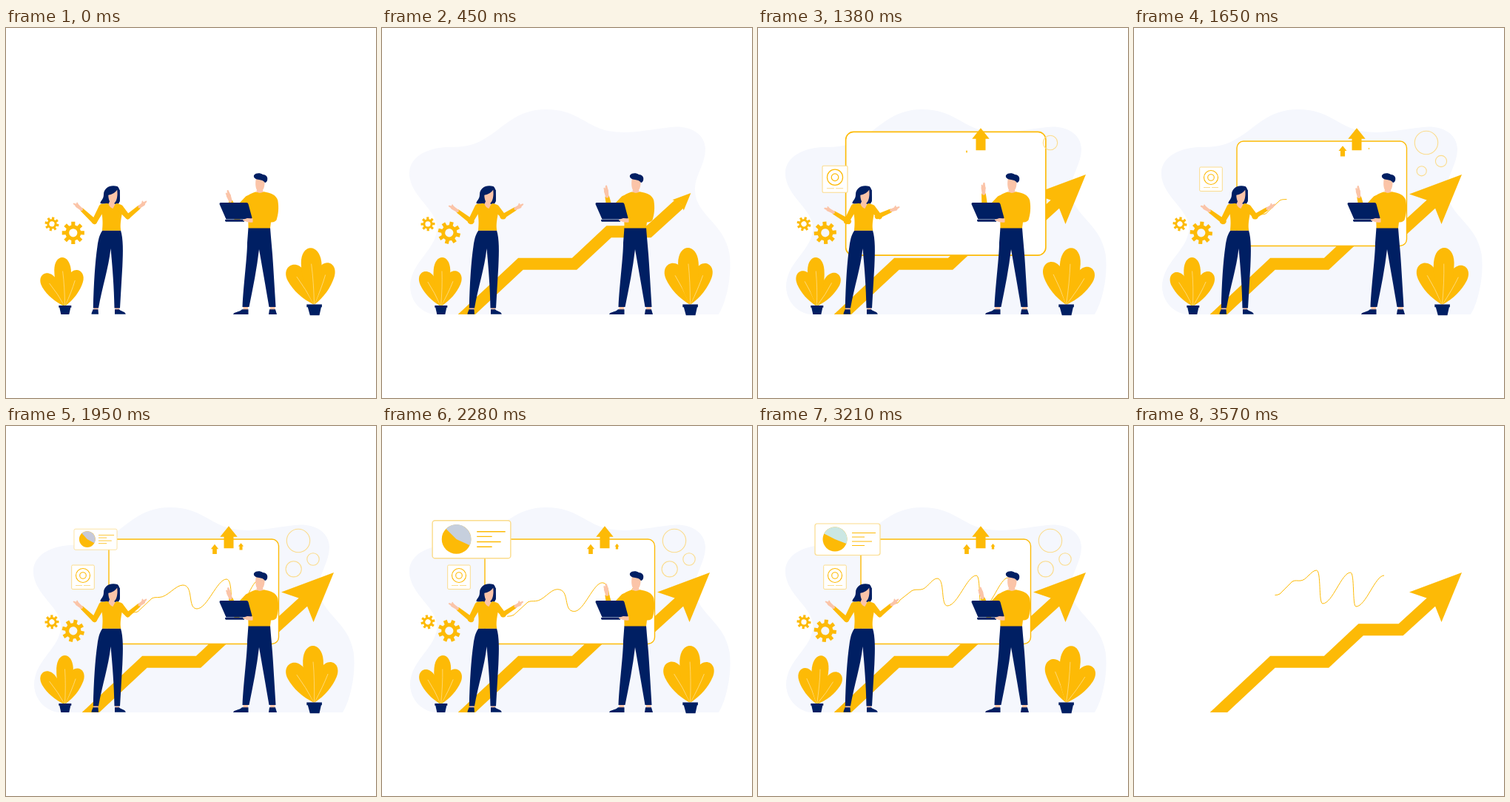
An HTML page for the animation above (3600 ms loop, 500 by 500 pixels).

```html
<!DOCTYPE html>
<html lang="en">
<head>
<meta charset="utf-8">
<title>Growth presentation</title>
<style>
  html, body { margin: 0; width: 100%; height: 100%; overflow: hidden; background: #fff; }
  svg { display: block; width: 100vw; height: 100vh; }
  .y { fill: #fdba06; }
  .n { fill: #001f63; }
  .s { fill: #fbc4a8; }
  .line { fill: none; stroke: #fdba06; }
  .pale { fill: none; stroke: #fbdc8c; }
  .card { fill: #fff; stroke: #fbdc8c; }
</style>
</head>
<body>
<svg viewBox="0 0 500 500">
  <defs><clipPath id="ground"><rect width="500" height="387"/></clipPath></defs>

  <path id="blob" fill="#f5f7fd" d="M222 110C180 110 165 135 138 150C112 166 92 158 72 163C46 169 34 184 37.5 203C43 232 78 248 74 275C70 302 38 318 38 350C39 375 60 387 72 387H455C468 365 473 328 469.500 305C463 264 424 253 423 220C422 200 437 185 437 163C436 140 412 131 390 134C355 138 335 144 305 139C275 132 262 110 222 110Z"/>

  <g clip-path="url(#ground)">
    <path id="shaft" class="line" stroke-width="16" stroke-miterlimit="8" pathLength="1" d="M102.4 398.200L187.300 318.800H260L306.500 275.300H360.500L406 233.800"/>
  </g>
  <path id="head" class="y" d="M443 198L372 224.500L395.500 232.500L407 243.500L415.500 265Z"/>

  <rect id="board" x="139" y="153" width="229.500" height="141.500" rx="9" fill="#fff" stroke="#fdba06" stroke-width="1.4"/>
  <path id="wave" class="line" stroke-width="1" pathLength="1"/>

  <g id="front">
    <g id="ups"></g>
    <g id="rings"></g>

    <g id="target">
      <rect class="card" x="88.7" y="188" width="30.6" height="32.5" rx="1.5"/>
      <circle class="line" cx="104" cy="202" r="9.5" stroke-width="1.1"/>
      <circle class="line" cx="104" cy="202" r="4.3" stroke-width="1.1"/>
      <path class="pale" d="M94 215.500H103M105 215.500H114"/>
    </g>

    <g id="chart">
      <rect class="card" x="77" y="132" width="88" height="42.5" rx="3" stroke-width="1.2"/>
      <circle class="y" cx="104" cy="153" r="16.5"/>
      <path id="slice"/>
      <path class="line" stroke-width="1.2" d="M127 144.500H159M127 150H144M127 156H154M127 161.500H144"/>
    </g>

    <path id="gear1" class="y" fill-rule="evenodd"/>
    <path id="gear2" class="y" fill-rule="evenodd"/>

    <g id="plants"></g>
    <path class="n" d="M71.300 375H88.300V377.800H87.300L85.300 387H74.300L72.300 377.800H71.300Z"/>
    <path class="n" d="M406.300 373.500H426.900V377.300H425.900L423.500 388.300H410.800L407.800 377.300H406.300Z"/>

    <g id="woman">
      <path class="n" d="M150.500 214C141 211 132 216 132 225C132 232 127.500 233 127.500 237C133 238.500 143 238.500 152 237.500C155 234 153.500 226 153.500 220C153 217 152 215 150.500 214Z"/>
      <path class="s" d="M118.500 377H124.500V381H118.500ZM147.500 377H153V381H147.500Z"/>
      <path class="n" d="M130.500 273.500H155C158.500 285 158.300 302 157.300 322L154 378.500H146.500C146 350 144 325 141.500 298C138.500 325 130 350 125 378.500H117.800C118.500 345 120.500 315 123.500 295C125 284 127 278 130.500 273.500Z"/>
      <path class="n" d="M117.500 380.200H124.500L125 386.700H115.500C115.500 384 117 383 117.500 380.200ZM147 380.200H153C155.500 383 161 383 161.800 386.700H147Z"/>
      <path class="y" d="M137 237C131 237 128 239 127.500 243L130 254C131 263 130.500 268 130 273.700H155.300C154 267 155 260 157 250L158 243C156 239 153 237.500 149.500 237L145 240Z"/>
      <g id="armL">
        <path class="y" data-limb="130,242,9,119.5,261.5,7"/>
        <g class="fore">
          <path class="y" data-limb="119.5,261.5,7,103,246,5"/>
          <path class="s" data-limb="102,245,4,96,240,5"/>
          <path class="s" data-limb="97,240.500,4,91.700,237.500,2"/>
          <path class="s" data-limb="97,240,3,96,236.500,1.800"/>
        </g>
      </g>
      <g id="armR">
        <path class="y" data-limb="154,243,9,164.5,255,6.5"/>
        <g class="fore">
          <path class="y" data-limb="164.5,255,6.5,179.5,242.5,5"/>
          <path class="s" data-limb="180.5,241.5,4,185.5,238,5"/>
          <path class="s" data-limb="185,238,4,189.3,234.500,2"/>
          <path class="s" data-limb="184.5,238,3,184.5,234.500,1.8"/>
        </g>
      </g>
      <path class="s" d="M138.500 224C142 220 147 218 150.500 218.500C151 226 150 234 146.500 236.500L147 239L144.500 244C141 243 139 240 138.500 237.500L140 234.500C138.500 231 138 227 138.500 224Z"/>
      <path class="n" d="M135 226C141 226 147.500 223.500 150.500 218L151.500 233L153.800 235V219L148 214L137 216Z"/>
    </g>

    <g id="man">
      <path class="s" d="M320.500 376H327V381H320.500ZM357 376H363.500V381H357Z"/>
      <path class="n" d="M327.500 270H357C358 285 360 302 361 320L364.500 377H355.500C351 350 346 322 342 299C339 325 334 350 328.500 377H319.500C321 345 326 310 326 290Z"/>
      <path class="n" d="M319 380.200H327.500V387H307C308 383.500 314 384.500 319 380.200ZM356 380.200H364L366 387H355Z"/>
      <path class="y" data-limb="327,231,9,311,247,8"/>
      <g id="wrist">
        <path class="y" data-limb="306,247,9,305.3,224,6"/>
        <path class="s" data-limb="305.3,222,4.5,305.3,215,6"/>
        <path class="s" data-limb="306,215,4.5,306.5,208.500,2.4"/>
        <path class="s" data-limb="304.5,216,3.5,303.5,211,2"/>
      </g>
      <path class="y" d="M337 221.500C341 222.500 345 222.500 348.500 221.300C358 223 365.500 226 367.300 233C369 243 368 252 365.500 259.500C363 262.500 360 262.500 358 262.500L357 270.500H327.500L327 240L320.500 236C321.500 228 328 225 337 221.500Z"/>
      <path class="s" d="M338 203L349.500 206C349.800 212 349 216.500 347 219L347.800 221.600C344 223.300 341 223 338 221.600L339 219C336.800 215 336.800 208 338 203Z"/>
      <path class="n" d="M335 199C338 195.300 344 196 347 198C351 198 354 201 353.200 205C353 207.500 351 209 350 209C348 206 345 205.500 342 205C338 204.500 334 203 335 199Z"/>
      <path class="n" d="M290 236H325Q327 236 327.500 238L332.500 256.500L331 258.500H297.500L288.500 238Q288.300 236 290 236ZM296 259H322V261.700H297Q296 261.500 296 259Z"/>
      <path class="s" d="M320 259L326 257L333.500 257.500V262.500C328 263.500 324 261.500 320 260Z"/>
    </g>
  </g>
</svg>
<script>
const LOOP = 3600, STEP = 30, LAST = LOOP - STEP;
const NS = 'http://www.w3.org/2000/svg';
const $ = id => document.getElementById(id);
const put = (el, attrs) => { for (const k in attrs) el.setAttribute(k, attrs[k]); return el; };
const add = (box, tag, attrs) => put(box.appendChild(document.createElementNS(NS, tag)), attrs);
const lerp = (a, b, u) => a + (b - a) * u;

// Smooth curve through [time, value] pairs without extra overshoot
function curve(...p) {
  const n = p.length;
  const slope = i => (p[i + 1][1] - p[i][1]) / (p[i + 1][0] - p[i][0]);
  const tan = p.map((_, i) => {
    if (!i || i === n - 1) return 0;
    const a = slope(i - 1), b = slope(i);
    return a * b > 0 ? 2 * a * b / (a + b) : 0;
  });
  return t => {
    if (t <= p[0][0]) return p[0][1];
    if (t >= p[n - 1][0]) return p[n - 1][1];
    let i = 0;
    while (t >= p[i + 1][0]) i++;
    const h = p[i + 1][0] - p[i][0], u = (t - p[i][0]) / h, v = 1 - u;
    return p[i][1] * v * v * (1 + 2 * u) + p[i + 1][1] * u * u * (3 - 2 * u)
      + h * (tan[i] * u * v * v - tan[i + 1] * u * u * v);
  };
}
const POSES = [0, 870, 1380, 1950, 2670, 3210];
const sway = (...v) => curve(...v.map((a, i) => [POSES[i], a]));
const pop = (start, peak, over, end) => curve([start, 0], [peak, over], [end, 1]);

function zoom(el, x, y, sx, sy = sx) {
  const on = sx > .01 && sy > .01;
  el.style.display = on ? '' : 'none';
  if (on) put(el, { transform: `translate(${x} ${y}) scale(${sx} ${sy}) translate(${-x} ${-y})` });
}

// Tapered limb with round ends
for (const el of document.querySelectorAll('[data-limb]')) {
  const [x, y, w, X, Y, W] = el.dataset.limb.split(',').map(Number);
  const d = Math.hypot(X - x, Y - y), nx = (y - Y) / d / 2, ny = (X - x) / d / 2;
  put(el, { d: `M${x + nx * w} ${y + ny * w}A${w / 2} ${w / 2} 0 0 1 ${x - nx * w} ${y - ny * w}`
    + `L${X - nx * W} ${Y - ny * W}A${W / 2} ${W / 2} 0 0 1 ${X + nx * W} ${Y + ny * W}Z` });
}

function gear(el, cx, cy, outer, root, hole) {
  const pts = [];
  for (let i = 0; i < 8; i++)
    for (const [off, r] of [[-.24, root], [-.17, outer], [.17, outer], [.24, root]]) {
      const a = i * Math.PI / 4 + off;
      pts.push((cx + r * Math.cos(a)).toFixed(2) + ' ' + (cy + r * Math.sin(a)).toFixed(2));
    }
  put(el, { d: `M${pts.join('L')}ZM${cx - hole} ${cy}a${hole} ${hole} 0 1 0 ${2 * hole} 0a${hole} ${hole} 0 1 0 ${-2 * hole} 0Z` });
}
gear($('gear1'), 90.8, 276.8, 15.3, 10.6, 5.6);
gear($('gear2'), 62, 264.8, 9.6, 6.6, 3.6);

function leaf(x, y, len, w, turn) {
  const g = add($('plants'), 'g', {});
  add(g, 'path', { class: 'y', d: `M0 0C${-w * .75} ${-len * .25} ${-w * 1.05} ${-len * .5} ${-w} ${-len * .74}`
    + `C${-w * .9} ${-len * 1.087} ${w * .9} ${-len * 1.087} ${w} ${-len * .74}C${w * 1.05} ${-len * .5} ${w * .75} ${-len * .25} 0 0Z` });
  add(g, 'path', { fill: 'none', stroke: '#ffe294', 'stroke-width': .7, d: `M0 0Q1.5 ${-len * .4} 0 ${-len * .72}` });
  return t => put(g, { transform: `translate(${x} ${y}) rotate(${turn(t)})` });
}
const leaves = [
  leaf(79.5, 376, 52, 10.8, sway(-34, -23, -26, -34, -20, -21.5)),
  leaf(79.5, 376, 52, 10.8, sway(21.5, 31, 32.5, 23, 32.5, 36)),
  leaf(79.5, 376, 66, 11.3, sway(-3.5, 6.5, -1.5, 0, 5.5, 5.5)),
  leaf(416.5, 374, 62, 13.2, sway(-32, -23, -23, -32, -24, -19.5)),
  leaf(416.5, 374, 60, 12.2, sway(20.5, 28, 34.5, 25.5, 27, 36)),
  leaf(416.5, 374, 77, 13.8, sway(-4, 0, 5.6, -1.5, 2, 5.6))
];

const upArrow = (x, y, k) => add(add($('ups'), 'g', {}), 'path', {
  class: 'y', d: 'M0 -30L11.7 -15.5H6.5V0H-6.5V-15.5H-11.7Z',
  transform: `translate(${x} ${y}) scale(${k})`
}).parentNode;
const ups = [upArrow(301, 165.3, 1), upArrow(282, 173, .44), upArrow(317.5, 167, .28)];
const rise = curve([720, 0], [870, .22], [1080, .8], [1200, 1.23], [1380, 1]);
const rise2 = curve([1350, .05], [1380, .25], [1560, 1.2], [1710, 1]);
const rise3 = curve([1560, 0], [1860, 1.2], [2100, .9]);

const rings = [[395, 155, 15.7, 1230], [415, 180, 8.2, 1440], [388.7, 193.3, 10.6, 1500]].map(([x, y, r, s]) => {
  const el = add($('rings'), 'circle', { class: 'pale', cx: x, cy: y, 'stroke-width': 1.1 });
  const size = pop(s, s + 270, 1.06, s + 420);
  return t => put(el, { r: r * size(t), visibility: size(t) > .01 ? 'visible' : 'hidden' });
});

// The line's turning points, at four moments
const WAVES = [
  [1950, [170, 252, 178, 251, 197, 233, 207, 231.5, 239, 215, 258, 247, 298, 207, 310, 250, 342, 208]],
  [2670, [168, 264, 178, 261, 197, 244.5, 209, 243, 234, 228, 262, 255, 297, 218, 322, 256, 360, 209]],
  [3210, [186, 240, 192, 235, 208, 222.5, 220, 221, 242, 206, 256, 243, 295, 202, 303, 246, 338, 205]],
  [3570, [190.5, 228.5, 197, 227, 214, 210, 225, 209, 246.5, 195, 255, 240, 292.5, 198, 300, 244, 338, 202]]
];
const wavePts = WAVES[0][1].map((_, i) => curve(...WAVES.map(([t, p]) => [t, p[i]])));
function wavePath(t) {
  const p = wavePts.map(f => f(t));
  let d = `M${p[0]} ${p[1]}Q${lerp(p[0], p[2], .6)} ${p[1]} ${p[2]} ${p[3]}L${p[4]} ${p[5]}`
    + `C${p[4] + 4} ${p[5] - 2} ${p[6] - 4} ${p[7] + .5} ${p[6]} ${p[7]}`;
  for (let i = 6; i < 16; i += 2) {
    const [x, y, X, Y] = p.slice(i, i + 4), w = X - x, down = Y > y;
    d += `C${x + w * (down ? .8 : .35)} ${y} ${X - w * (down ? .7 : .32)} ${Y} ${X} ${Y}`;
  }
  return d;
}

const blobIn = curve([90, 0], [600, 1]);
const shaftIn = curve([0, 0], [480, 1]);
const headIn = curve([390, 0], [540, 1], [840, .85], [1080, 1]);
const boardIn = pop(1080, 1290, 1.26, 1530);
const targetIn = pop(1170, 1350, 1.12, 1530);
const chartIn = pop(1725, 2175, 1.32, 2430);
const waveIn = curve([1560, 0], [1920, 1]);
const armDrop = sway(0, 1, 1, 0, 1, 0);
const wristUp = sway(0, .96, .85, .07, 1, .12);
const sliceFrom = curve([1950, 228], [2670, 218], [3570, 203]);
const sliceTo = curve([1950, 388], [2670, 380], [3570, 382]);
const tint = [curve([1950, 198], [2670, 197], [3210, 203]),
  curve([1950, 201], [2670, 219], [3210, 231]), curve([1950, 217], [2670, 226], [3210, 227])];

function slicePath(t) {
  const at = deg => {
    const a = deg * Math.PI / 180;
    return `${104 + 16.5 * Math.cos(a)} ${153 + 16.5 * Math.sin(a)}`;
  };
  const a = sliceFrom(t), b = sliceTo(t);
  return `M104 153L${at(a)}A16.5 16.5 0 ${b - a > 180 ? 1 : 0} 1 ${at(b)}Z`;
}

function draw(t) {
  const last = t >= LAST;
  $('front').style.display = last ? 'none' : '';
  put($('blob'), { opacity: last ? 0 : blobIn(t) });

  const s = shaftIn(t);
  put($('shaft'), { 'stroke-dasharray': `${s} 2`, visibility: s > 0 ? 'visible' : 'hidden' });
  zoom($('head'), 403.5, 236.5, headIn(t));
  zoom($('board'), 253.75, 223.75, last ? 0 : boardIn(t));

  const w = waveIn(t);
  put($('wave'), { d: wavePath(t), 'stroke-dasharray': `${w} 2`, visibility: w > 0 ? 'visible' : 'hidden' });

  const sy = rise(t);
  zoom(ups[0], 301, 165.3, 1 + .08 * Math.max(0, 1 - sy), sy);
  zoom(ups[1], 282, 167, t < 1350 ? 0 : rise2(t));
  zoom(ups[2], 317.5, 163, rise3(t));
  rings.forEach(f => f(t));

  zoom($('target'), 104, 204.3, targetIn(t));
  zoom($('chart'), 121, 153.2, chartIn(t));
  put($('slice'), { d: slicePath(t), fill: `rgb(${tint.map(f => Math.round(f(t)))})` });

  put($('gear1'), { transform: `rotate(${t * .03} 90.8 276.8)` });
  put($('gear2'), { transform: `rotate(${12 - t * .03} 62 264.8)` });
  leaves.forEach(f => f(t));

  const a = armDrop(t), k = 1 - wristUp(t);
  put(document.querySelector('#armL .fore'), { transform: `translate(${3 * a} 0) rotate(${-12 * a} 119.5 261.5)` });
  put(document.querySelector('#armR .fore'), { transform: `translate(${-3.5 * a} 0) rotate(${16 * a} 164.5 255)` });
  put($('wrist'), { transform: `translate(${6 * k} ${9 * k}) rotate(${-20 * k} 308 246)` });
}

const start = performance.now();
function tick() {
  const t = (performance.now() - start) % LOOP;
  draw(Math.floor(t / STEP) * STEP);
  requestAnimationFrame(tick);
}
tick();
</script>
</body>
</html>
```
